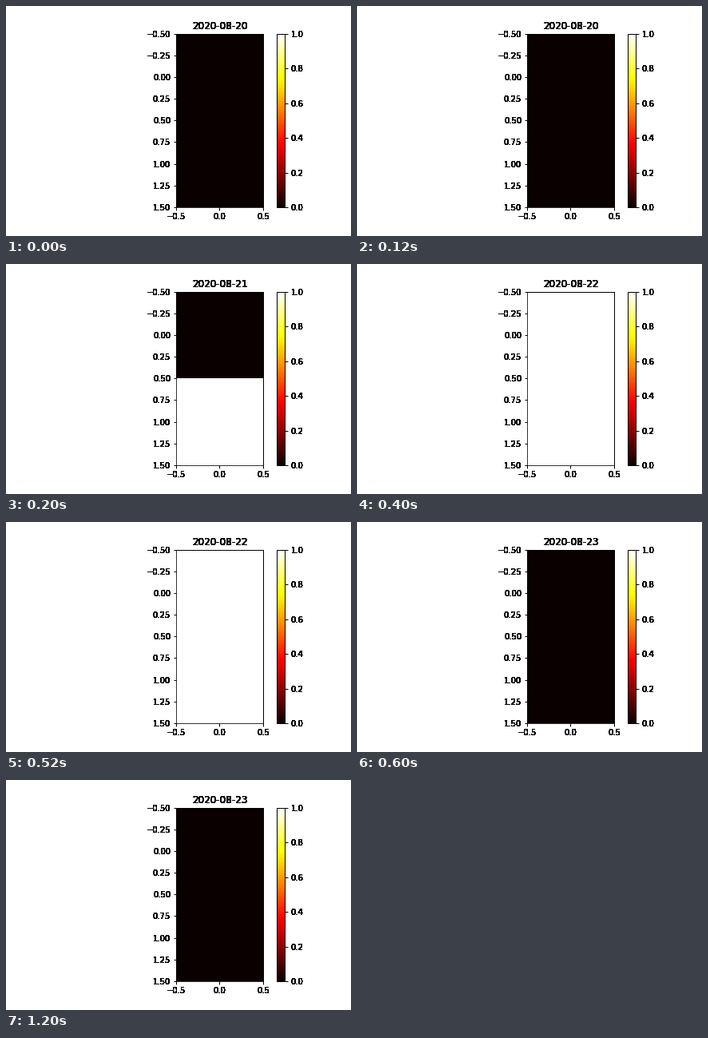
A matplotlib script that plays this animation: 432 by 288 pixels, repeating every 1.6 s.

```python
import matplotlib.pyplot as plt
import numpy as np
from matplotlib.animation import FuncAnimation

STEP_MS = 200
FRAMES = 8  # the last day is held for five steps
DAYS = [(0, 0), (0, 1), (1, 1), (0, 0)]  # top and bottom cell per day

plt.rcParams.update({
    "font.family": "DejaVu Sans",
    "font.size": 10,
    "xtick.major.width": 1,
    "ytick.major.width": 1,
})


def thicken(text, passes=30):
    """Draw the text repeatedly so its soft edges turn solid black."""
    draw_once = text.draw

    def draw(renderer):
        for _ in range(passes):
            draw_once(renderer)

    text.draw = draw


def cells(day):
    return np.array(DAYS[day], dtype=float).reshape(2, 1)


fig = plt.figure(figsize=(6, 4), dpi=72, facecolor="white")
fig.subplots_adjust(left=0.125, right=0.9, bottom=0.125, top=0.88)
ax = fig.add_subplot()
image = ax.imshow(cells(0), cmap="hot", vmin=0, vmax=1)
bar = fig.colorbar(image, ax=ax)
bar.outline.set_linewidth(1)
for side in ("top", "right"):
    ax.spines[side].set_linewidth(1)
title = ax.set_title("2020-08-20")

fig.canvas.draw()
labels = ax.get_xticklabels() + ax.get_yticklabels() + bar.ax.get_yticklabels()
for text in [title, *labels]:
    thicken(text)


def update(frame):
    day = min(frame, len(DAYS) - 1)
    image.set_data(cells(day))
    title.set_text(f"2020-08-{20 + day}")
    return image, title


anim = FuncAnimation(fig, update, frames=FRAMES, init_func=lambda: update(0),
                     interval=STEP_MS, repeat=True, repeat_delay=0)
plt.show()
```
